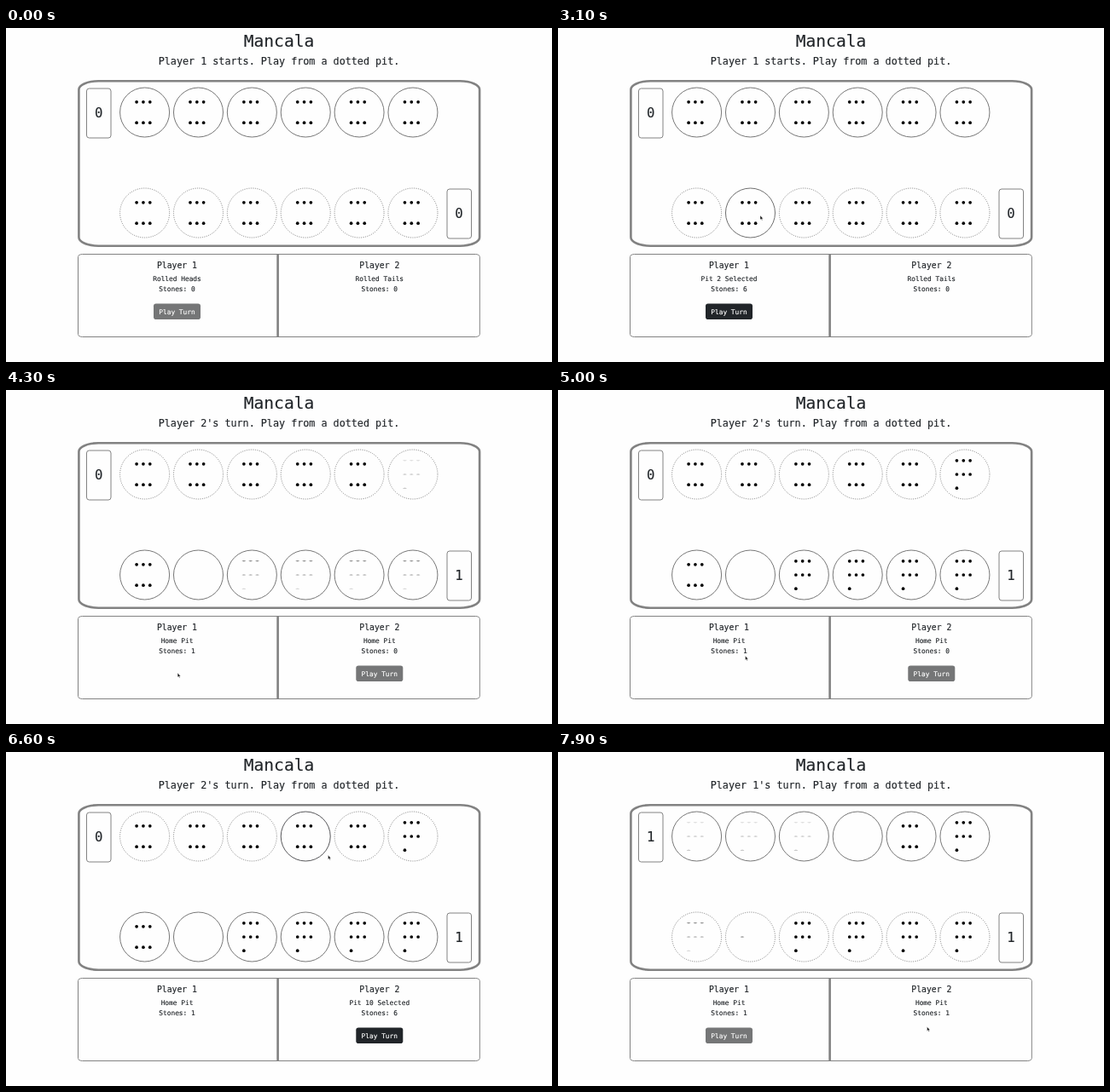
An HTML page for the animation above (8000 ms loop, 640 by 392 pixels).

```html
<!DOCTYPE html>
<html lang="en">
<head>
<meta charset="utf-8">
<title>Mancala</title>
<style>
  html, body { margin: 0; width: 100%; height: 100%; overflow: hidden; background: #fefefe; }
  svg { display: block; width: 640px; height: 392px; }
  text { font-family: "DejaVu Sans Mono", "Noto Sans Mono", monospace; fill: #212529; stroke: #212529; stroke-width: .15; text-anchor: middle; white-space: pre; }
  .frame { fill: none; stroke: #828282; }
  .pit { fill: none; stroke: #777; }
  .open { stroke: #7c7c7c; stroke-dasharray: 1 1.5; }
  .button text { fill: #fff; stroke: #fff; }
</style>
</head>
<body>
<svg id="stage" viewBox="0 0 640 392"></svg>
<script>
const LOOP = 8000, STEP = 100, GROW = 600, REM = 7.83;
const stage = document.getElementById('stage');
const clamp = v => Math.max(0, Math.min(1, v));
const mix = (a, b, k) => a + (b - a) * k;

function add(tag, attrs, parent = stage) {
  const el = document.createElementNS('http://www.w3.org/2000/svg', tag);
  for (const key in attrs) el.setAttribute(key, attrs[key]);
  parent.appendChild(el);
  return el;
}
function label(x, y, size, content = '', parent = stage) {
  const el = add('text', { x, y, 'font-size': size * REM }, parent);
  el.textContent = content;
  return el;
}
const setText = (el, value) => { if (el.textContent !== value) el.textContent = value; };
const box = (x, y, width, height, rx, ry, weight) =>
  add('rect', { class: 'frame', x, y, width, height, rx, ry, 'stroke-width': weight });

// Board and panels
label(320, 22.3, 2.5, 'Mancala');
const message = label(320, 42.5, 1.5);
box(85.4, 62.3, 469.7, 193.4, 23, 10, 2.6);
box(94.5, 71, 28.5, 58, 3, 3, 1);
box(517, 189, 28.5, 58, 3, 3, 1);
box(84.5, 265.5, 470.8, 97, 5, 3, 1);
add('path', { d: 'M318.6 265V363', stroke: '#808080', 'stroke-width': 2.6 });

// Ring of 14: bottom row, right home, top row backwards, left home
const HOMES = [6, 13];
const cells = Array.from({ length: 14 }, (_, i) => {
  if (HOMES.includes(i)) return { home: i === 6 ? label(531, 223.2, 2) : label(108.6, 105.3, 2) };
  const top = i > 6;
  const cx = 162.6 + 62.87 * (top ? 12 - i : i), cy = top ? 99 : 217;
  return { cx, cy, top, ring: add('circle', { class: 'pit', cx, cy, r: 29 }), stones: add('g', {}) };
});

const panels = [200.5, 437.8].map((x, i) => {
  label(x, 282, 1.25, 'Player ' + (i + 1));
  const note = label(x, 297.2, 1), count = label(x, 309, 1);
  const button = add('g', { class: 'button' });
  const face = add('rect', { x: x - 27.5, y: 323.5, width: 55, height: 18.5, rx: 2.8 }, button);
  label(x, 335.6, 1, 'Play Turn', button);
  return { x, note, count, button, face };
});

const pointer = add('g', {});
const arrow = add('path', { d: 'M0 0V5L1.2 4L2 5.8L2.8 5.4L2 3.8H3.5Z', fill: '#111', stroke: '#fff', 'stroke-width': .4 }, pointer);
const hand = add('path', { d: 'M0 0H1.2V2.2L3.8 3V5L3.2 6.4H.5L-1.2 3.8H0Z', fill: '#fff', stroke: '#111', 'stroke-width': .6 }, pointer);

// Game states follow from the rules
function select(state, at, pick) {
  const notes = [...state.notes], shown = [...state.shown];
  notes[state.turn] = `Pit ${pick + 1} Selected`;
  shown[state.turn] = state.board[pick];
  return { ...state, at, pick, notes, shown, before: null };
}
function sow(state, at) {
  const board = [...state.board], turn = 1 - state.turn;
  board[state.pick] = 0;
  for (let n = 1; n <= state.board[state.pick]; n++) board[(state.pick + n) % 14]++;
  return {
    at, turn, board, before: state.board, say: `Player ${turn + 1}'s turn. `,
    notes: ['Home Pit', 'Home Pit'], shown: HOMES.map(h => board[h])
  };
}
const opening = {
  at: 0, turn: 0, say: 'Player 1 starts. ', notes: ['Rolled Heads', 'Rolled Tails'], shown: [0, 0],
  board: cells.map(c => c.home ? 0 : 6)
};
const states = [opening];
const push = (step, ...args) => states.push(step(states[states.length - 1], ...args));
push(select, 3100, 1);
push(sow, 4200);
push(select, 6400, 9);
push(sow, 7800);

// Pointer moves; bend is the control point of a curved path
const home = [501, 95];
const moves = [
  { from: 500, to: 1400, end: [205, 327], bend: [40, 45] },
  { from: 1400, to: 1700, end: [205.5, 332] },
  { from: 2000, to: 2900, end: [237, 220] },
  { from: 3200, to: 3800, end: [198.5, 335] },
  { from: 4100, to: 5000, end: [219.5, 312] },
  { from: 5000, to: 5300, end: [276, 292] },
  { from: 5400, to: 6300, end: [377.5, 121], bend: [350, 10] },
  { from: 6700, to: 7200, end: [432, 331] },
  { from: 7400, to: 7900, end: [432.6, 322.5] }
];
function pointerAt(t) {
  let pos = home;
  for (const { from, to, end, bend } of moves) {
    if (t < from) break;
    const u = clamp((t - from) / (to - from)), k = u * u * (3 - 2 * u);
    pos = pos.map((p, i) => {
      const c = bend ? bend[i] : (p + end[i]) / 2;
      return mix(mix(p, c, k), mix(c, end[i], k), k);
    });
  }
  return pos;
}

function drawStones(cell, count, age) {
  cell.stones.replaceChildren();
  const rows = Math.ceil(count / 3), gap = rows === 2 ? 24.3 : 16.2;
  for (let n = 0; n < count; n++) {
    const row = Math.floor(n / 3);
    const delay = cell.top ? 60 - row * 12 : row * 28;
    const p = clamp((age - delay) / GROW);
    add('ellipse', {
      cx: cell.cx - 9.5 + REM * (n % 3),
      cy: cell.cy + (row - (rows - 1) / 2) * gap,
      rx: mix(2.5, 1.85, p),
      ry: mix(.4, 1.85, p * p),
      opacity: clamp(p * 4)
    }, cell.stones);
  }
}

function pickColor(age) {
  const k = clamp(age / 600), grey = mix(110, 42, k);
  return `rgb(${grey},${grey},${grey + 80 * k * k * k})`;
}

function render(t) {
  const state = states.filter(s => s.at <= t).pop();
  const { turn, board, before, pick } = state, age = t - state.at;
  const [px, py] = pointerAt(t);

  setText(message, state.say + 'Play from a dotted pit.');
  cells.forEach((cell, i) => {
    if (cell.home) return setText(cell.home, String(board[i]));
    const picked = pick === i, open = cell.top === (turn === 1) && !picked;
    cell.ring.setAttribute('class', open ? 'pit open' : 'pit');
    cell.ring.style.stroke = picked ? pickColor(age) : '';
    drawStones(cell, board[i], before && board[i] > before[i] ? age : Infinity);
  });

  let over = false;
  panels.forEach((panel, i) => {
    setText(panel.note, state.notes[i]);
    setText(panel.count, 'Stones: ' + state.shown[i]);
    const ready = turn === i && pick !== undefined;
    const hover = ready && Math.abs(px - panel.x) < 27.5 && py > 323.5 && py < 342;
    over = over || hover;
    panel.button.style.display = turn === i ? '' : 'none';
    panel.face.setAttribute('fill', !ready ? '#757677' : hover ? '#424649' : '#212529');
  });

  pointer.style.display = t < 400 ? 'none' : '';
  pointer.setAttribute('transform', `translate(${px} ${py})`);
  arrow.style.display = over ? 'none' : '';
  hand.style.display = over ? '' : 'none';
}

const origin = performance.now();
let last = -1;
function tick() {
  const t = Math.floor(((performance.now() - origin) % LOOP) / STEP) * STEP;
  if (t !== last) render(last = t);
  requestAnimationFrame(tick);
}
tick();
</script>
</body>
</html>
```
